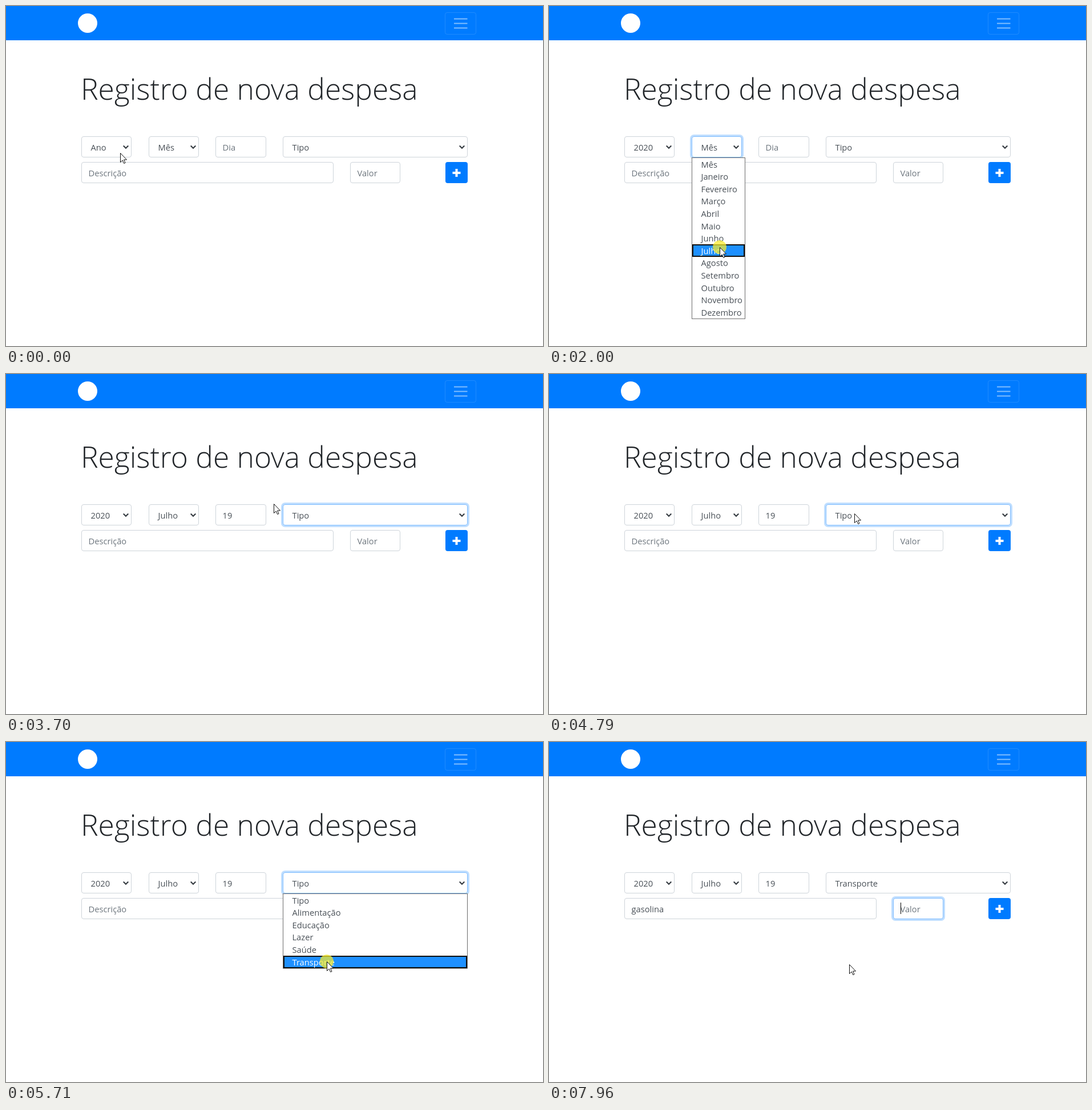
Write an HTML page with a canvas that moves like this. It is 941x595 px and loops after 8 s.

```html
<!DOCTYPE html>
<html lang="pt">
<head>
<meta charset="utf-8">
<title>Registro de nova despesa</title>
<style>
  html, body { margin: 0; width: 100%; height: 100%; overflow: hidden; background: #fff; }
  canvas { display: block; }
</style>
</head>
<body>
<canvas id="stage" width="941" height="595"></canvas>
<script>
const ctx = document.getElementById('stage').getContext('2d');
const LOOP = 8000, STEP = 76, FADE = 70, ROW = 21.6;
const FONT = '14.7px "Open Sans", sans-serif';
const BLUE = '#007bff', INK = '#495057', MUTED = '#6c757d';

const months = ['Mês', 'Janeiro', 'Fevereiro', 'Março', 'Abril', 'Maio', 'Junho',
  'Julho', 'Agosto', 'Setembro', 'Outubro', 'Novembro', 'Dezembro'];
const types = ['Tipo', 'Alimentação', 'Educação', 'Lazer', 'Saúde', 'Transporte'];

// open: time span of the drop-down; focus: time span of the focus ring
const selects = [
  { x: 132, w: 88, listW: 88, options: ['Ano', '2020'], pick: 1, open: [70, 610], focus: [70, 980] },
  { x: 250, w: 88, listW: 94, options: months, pick: 7, open: [930, 2080], focus: [980, 2460] },
  { x: 485, w: 324, listW: 324, options: types, pick: 5, open: [4940, 5790], focus: [3630, 6110] },
];
const inputs = [
  { x: 367, y: 228, w: 89, hint: 'Dia', text: '19', keys: [2850, 3400], focus: [2460, 3630] },
  { x: 132, y: 273, w: 442, hint: 'Descrição', text: 'gasolina',
    keys: [6640, 6720, 6870, 7040, 7190, 7420, 7500, 7650], focus: [6110, 7880] },
  { x: 603, y: 273, w: 88, hint: 'Valor', text: '', keys: [], focus: [7880, LOOP] },
];

// Pointer moves: start time, number of steps, destination
const moves = [
  [150, 4, 199, 298], [530, 4, 299, 251], [930, 1, 303, 250], [1080, 4, 345, 385],
  [1540, 5, 299, 422], [2080, 4, 402, 250], [2850, 2, 469, 227], [4640, 3, 568, 253],
  [4940, 3, 555, 331], [5250, 5, 562, 384], [6110, 3, 526, 389],
];
const clicks = [[70, 150], [530, 610], [930, 1000], [1920, 2080], [4940, 5020], [5710, 5790]];

const within = (t, [from, to]) => t >= from && t < to;
const clamp = (v, lo, hi) => Math.max(lo, Math.min(hi, v));

function pointerAt(t) {
  let x = 200, y = 257;
  for (const [start, steps, toX, toY] of moves) {
    if (t < start) break;
    const p = Math.min(1, (Math.floor((t - start) / STEP) + 1) / steps);
    x += (toX - x) * p;
    y += (toY - y) * p;
  }
  return { x, y };
}

function rounded(x, y, w, h, r) {
  ctx.beginPath();
  ctx.roundRect(x, y, w, h, r);
}

function line(points, color, width) {
  ctx.beginPath();
  points.forEach(([x, y]) => ctx.lineTo(x, y));
  ctx.strokeStyle = color;
  ctx.lineWidth = width;
  ctx.stroke();
}

function label(text, x, y, color = INK, font = FONT) {
  ctx.font = font;
  ctx.fillStyle = color;
  ctx.fillText(text, x, y);
}

function drawField(x, y, w, focus, t) {
  const glow = clamp((t - focus[0]) / FADE, 0, 1) * clamp(1 - (t - focus[1]) / FADE, 0, 1);
  if (glow) {
    rounded(x - 3, y - 3, w + 6, 43, 7);
    ctx.fillStyle = `rgba(0,123,255,${0.25 * glow})`;
    ctx.fill();
  }
  rounded(x + 0.5, y + 0.5, w - 1, 36, 3.5);
  ctx.fillStyle = '#fff';
  ctx.fill();
  ctx.lineWidth = 1;
  ctx.strokeStyle = `rgb(${206 - 78 * glow},${212 - 23 * glow},${218 + 37 * glow})`;
  ctx.stroke();
}

function drawSelect(s, t) {
  drawField(s.x, 228, s.w, s.focus, t);
  label(s.options[t >= s.open[1] ? s.pick : 0], s.x + 16.5, 253);
  const cx = s.x + s.w - 10;
  line([[cx - 4.3, 244.5], [cx, 248.8], [cx + 4.3, 244.5]], '#343a40', 2);
}

function drawInput(f, t) {
  drawField(f.x, f.y, f.w, f.focus, t);
  const typed = f.text.slice(0, f.keys.filter(k => t >= k).length);
  const x = f.x + 12.5, baseline = f.y + 24.5;
  label(typed || f.hint, x, baseline, typed ? INK : MUTED);
  if (within(t, f.focus)) {
    ctx.fillStyle = '#000';
    ctx.fillRect(Math.round(x + ctx.measureText(typed).width), f.y + 8, 1, 20);
  }
}

function drawList(s, pointerY) {
  const h = s.options.length * ROW + 2;
  const active = clamp(Math.floor((pointerY - 266.5) / ROW), 0, s.options.length - 1);
  ctx.fillStyle = '#fff';
  ctx.fillRect(s.x, 265, s.listW, h);
  ctx.strokeStyle = '#6b6b6b';
  ctx.lineWidth = 1;
  ctx.strokeRect(s.x + 0.5, 265.5, s.listW - 1, h - 1);
  s.options.forEach((option, i) => {
    if (i === active) {
      const top = Math.round(266 + i * ROW);
      ctx.fillStyle = '#1e90ff';
      ctx.fillRect(s.x + 1, top, s.listW - 2, 22);
      ctx.strokeStyle = '#101010';
      ctx.lineWidth = 2;
      ctx.strokeRect(s.x + 2, top + 1, s.listW - 4, 20);
    }
    label(option, s.x + 16.5, 282.5 + i * ROW, i === active ? '#fff' : INK);
  });
}

function drawPointer({ x, y }, t) {
  if (clicks.some(span => within(t, span))) {
    ctx.beginPath();
    ctx.arc(x, y, 12, 0, 7);
    ctx.fillStyle = 'rgba(250,235,40,.72)';
    ctx.fill();
  }
  ctx.save();
  ctx.translate(Math.round(x), Math.round(y));
  const overDay = x > 367 && x < 456 && y > 228 && y < 265;
  if (overDay) {
    line([[-3, -7.5], [3, -7.5]], '#000', 1);
    line([[0.5, -7.5], [0.5, 7.5]], '#000', 1);
    line([[-3, 7.5], [3, 7.5]], '#000', 1);
  } else {
    const arrow = new Path2D('M.5.5V16.5L4.2 13 6.7 18.5 9 17.5 6.6 12H11.5Z');
    ctx.fillStyle = '#fff';
    ctx.fill(arrow);
    ctx.strokeStyle = '#111';
    ctx.lineWidth = 1;
    ctx.stroke(arrow);
  }
  ctx.restore();
}

function drawPage() {
  ctx.fillStyle = '#fff';
  ctx.fillRect(0, 0, 941, 595);
  ctx.fillStyle = BLUE;
  ctx.fillRect(0, 0, 941, 60);
  ctx.beginPath();
  ctx.arc(143, 30, 17, 0, 7);
  ctx.fillStyle = '#fff';
  ctx.fill();

  rounded(769.5, 11.5, 54, 38, 3.5);
  ctx.strokeStyle = 'rgba(255,255,255,.12)';
  ctx.lineWidth = 1;
  ctx.stroke();
  for (const y of [22.5, 30.5, 38.5]) line([[785, y], [808.5, y]], 'rgba(255,255,255,.5)', 2);

  label('Registro de nova despesa', 131, 163.5, '#212529', '300 51.5px "Open Sans", sans-serif');

  rounded(770, 273, 39, 37, 4);
  ctx.fillStyle = BLUE;
  ctx.fill();
  line([[782.5, 292], [796.5, 292]], '#fff', 4);
  line([[789.5, 285], [789.5, 299]], '#fff', 4);
}

function draw() {
  const t = performance.now() % LOOP;
  const pointer = pointerAt(t);
  drawPage();
  selects.forEach(s => drawSelect(s, t));
  inputs.forEach(f => drawInput(f, t));
  selects.filter(s => within(t, s.open)).forEach(s => drawList(s, pointer.y));
  drawPointer(pointer, t);
  requestAnimationFrame(draw);
}
draw();
</script>
</body>
</html>
```
